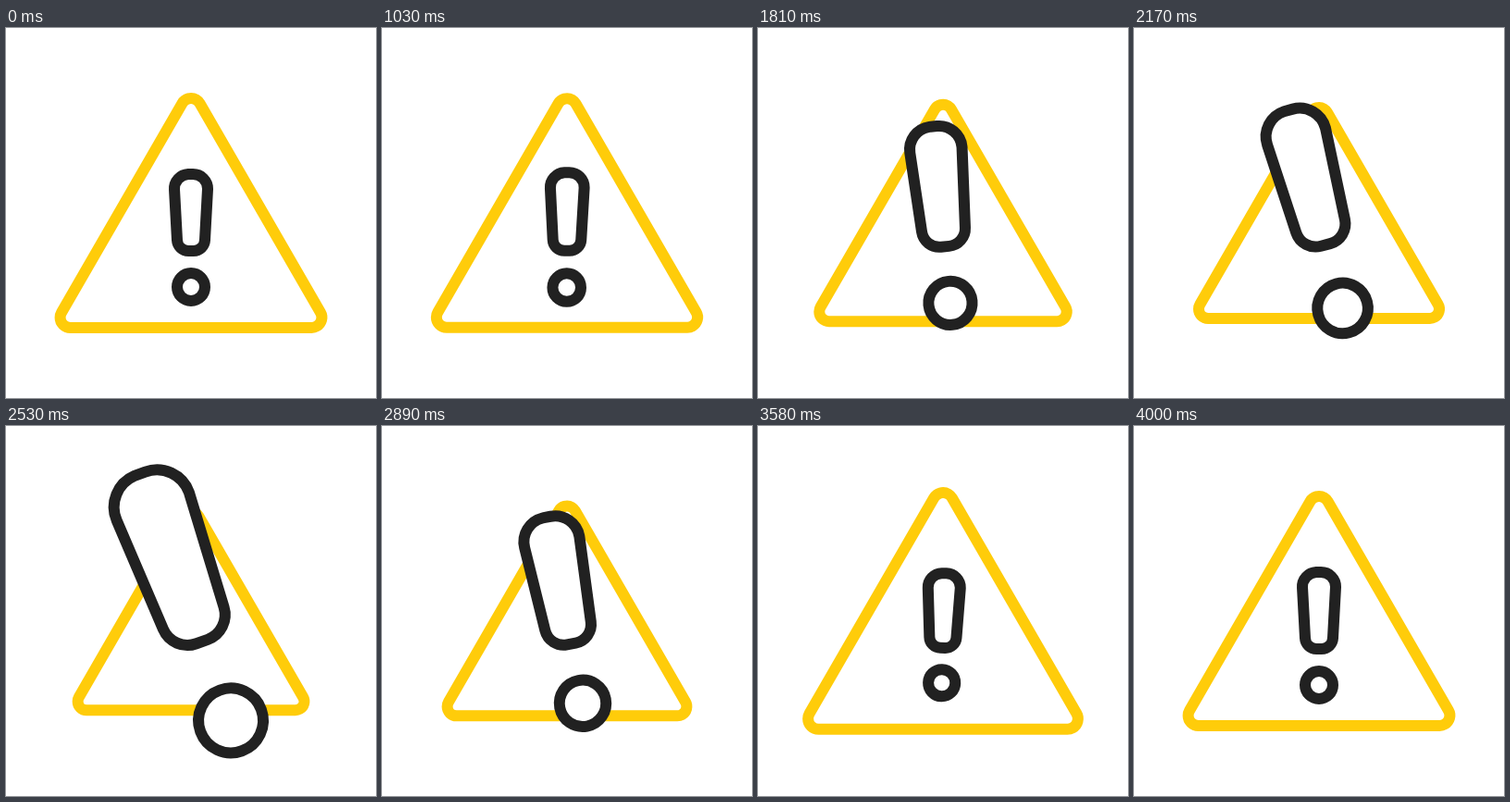
An HTML page with a canvas for the animation above (4030 ms loop, 400 by 400 pixels).

```html
<!DOCTYPE html>
<html>
<head>
<meta charset="utf-8">
<title>Warning sign</title>
<style>
  html, body { margin: 0; width: 100%; height: 100%; overflow: hidden; background: #fff; }
  canvas { display: block; width: 400px; height: 400px; }
</style>
</head>
<body>
<canvas id="stage" width="400" height="400"></canvas>
<script>
const ctx = document.getElementById('stage').getContext('2d');
const { PI } = Math;
const LOOP = 4030, HOLD = 1030, STEP = 30;
const YELLOW = '#ffcc0a', DARK = '#212121', WHITE = '#fff';

// Swing right, swing left, overshoot, settle
const POSES = [
  { at: 1000, angle: 0, mark: 1, sign: 1 },
  { at: 1430, angle: 20.8, mark: 2.37, sign: .861 },
  { at: 1870, angle: -8, mark: 1.53, sign: .95 },
  { at: 2630, angle: -20.3, mark: 2.37, sign: .861 },
  { at: 2890, angle: -10.8, mark: 1.68, sign: .915 },
  { at: 3220, angle: 5.6, mark: .89, sign: 1.122 },
  { at: 3760, angle: 0, mark: 1, sign: 1 }
];

const slope = (i, name) => {
  const a = POSES[i], b = POSES[i + 1];
  return a && b ? (b[name] - a[name]) / (b.at - a.at) : 0;
};

// Speed at a pose: zero at turning points, otherwise the harmonic mean
function speed(i, name) {
  const a = slope(i - 1, name), b = slope(i, name);
  return a * b > 0 ? 2 * a * b / (a + b) : 0;
}

function valueAt(time, name) {
  const next = POSES.findIndex(pose => pose.at > time);
  if (next < 1) return POSES[0][name];
  const a = POSES[next - 1], b = POSES[next];
  const d = b.at - a.at, u = (time - a.at) / d, w = 1 - u;
  return a[name] * w * w * (1 + 2 * u) + b[name] * u * u * (3 - 2 * u)
    + d * u * w * (w * speed(next - 1, name) - u * speed(next, name));
}

// Closed outline made of corner arcs: [x, y, radius, from, to]
function outline(arcs, scale, color) {
  ctx.beginPath();
  for (const [x, y, r, from, to] of arcs) ctx.arc(x * scale, y * scale, r * scale, from, to);
  ctx.closePath();
  ctx.fillStyle = WHITE;
  ctx.fill();
  ctx.strokeStyle = color;
  ctx.stroke();
}

const TRIANGLE = [0, 1, 2].map(i => {
  const a = -PI / 2 + i * PI * 2 / 3;
  return [150.6 * Math.cos(a), 37.6 + 150.6 * Math.sin(a), 11, a - PI / 3, a + PI / 3];
});
const TAPER = .054;
const BAR = [
  [-2.2, -52.2, 15.8, PI - TAPER, PI * 1.5],
  [2.2, -52.2, 15.8, -PI / 2, TAPER],
  [2.8, 2.8, 12.2, TAPER, PI / 2],
  [-2.8, 2.8, 12.2, PI / 2, PI - TAPER]
];
const DOT = [[0, 54, 15, 0, 2 * PI]];

function draw(time) {
  ctx.setTransform(1, 0, 0, 1, 200, 200);
  ctx.fillStyle = WHITE;
  ctx.fillRect(-200, -200, 400, 400);
  ctx.lineWidth = 12;
  outline(TRIANGLE, valueAt(time, 'sign'), YELLOW);

  // The mark rises whenever it leaves its resting size
  const scale = valueAt(time, 'mark');
  const change = Math.abs(scale - 1);
  ctx.translate(0, 26 - 25.8 * change + 4.8 * change * change);
  ctx.rotate(valueAt(time, 'angle') * PI / 180);
  outline(BAR, scale, DARK);
  outline(DOT, scale, DARK);
}

function tick() {
  const t = performance.now() % LOOP;
  draw(t < HOLD ? 0 : t - (t - HOLD) % STEP);
  requestAnimationFrame(tick);
}
tick();
</script>
</body>
</html>
```
